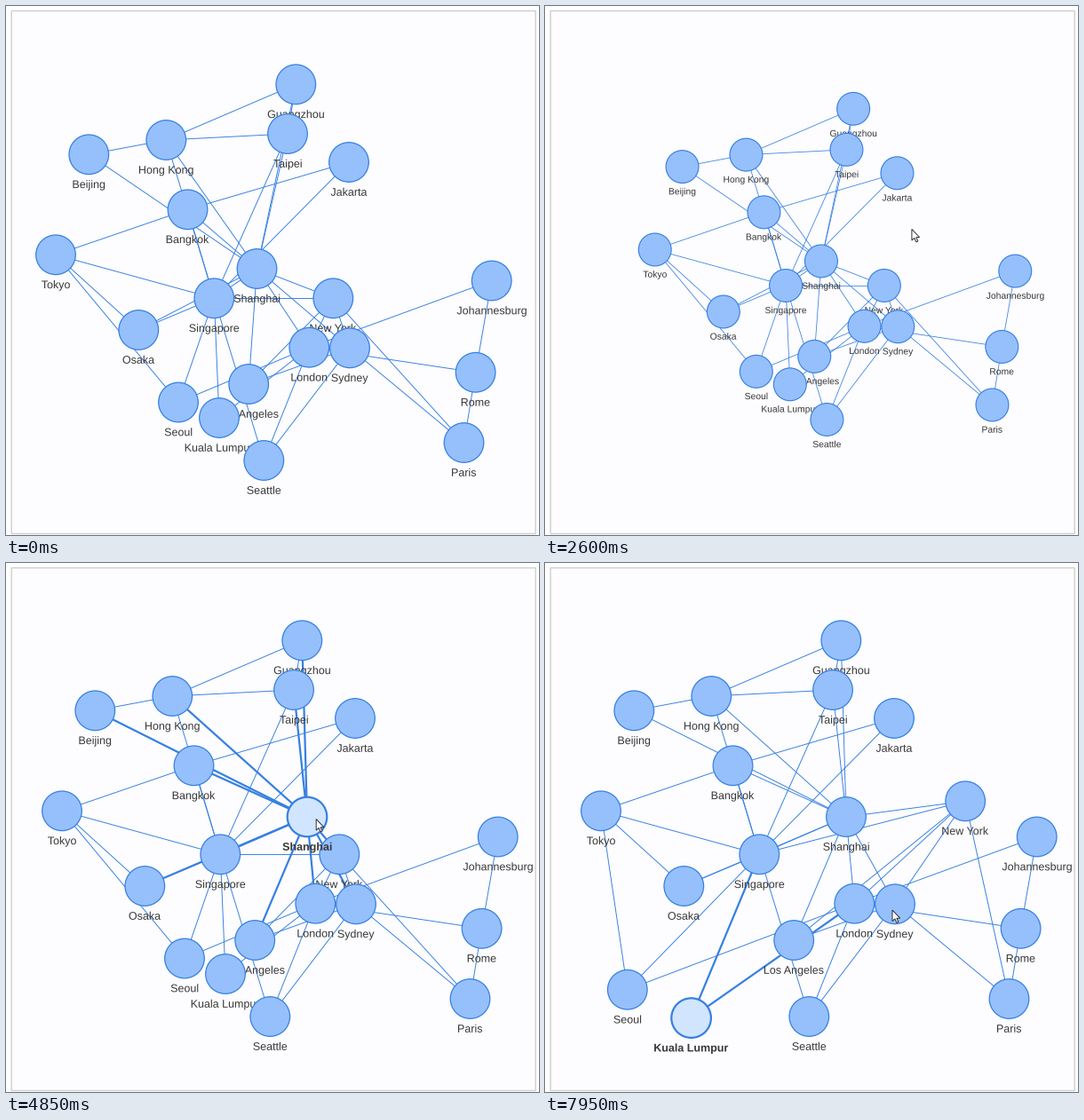
Write a matplotlib script that moves like this. It is 600 px wide and 596 px high and loops after 8 s.

```python
import numpy as np
import matplotlib.pyplot as plt
from matplotlib.animation import FuncAnimation
from matplotlib.collections import LineCollection
from matplotlib.patches import Circle, PathPatch, Polygon, Rectangle
from matplotlib.textpath import TextPath
from matplotlib.transforms import Affine2D

W, H, DPI = 600, 596, 100
STEP, LOOP = 50, 8000
PT = 72 / DPI
RADIUS, FONT, BASELINE = 22.3, 12.5, 37.8

BLUE, FILL, PICKED, INK = "#3580e2", "#96c0fc", "#d2e5ff", "#383838"

# Drawing order matters: later nodes cover earlier labels.
NODES = {
    "Guangzhou": (333.3, 87.3), "Taipei": (324, 143), "Hong Kong": (187.3, 150),
    "Beijing": (100.3, 166.3), "Jakarta": (393, 175), "Bangkok": (211.5, 228.3),
    "Tokyo": (63, 279.3), "Singapore": (241.3, 328.3), "Shanghai": (289.5, 295),
    "Osaka": (156.3, 364), "New York": (375.3, 328.3), "London": (348.3, 383.7),
    "Sydney": (394, 384.3), "Los Angeles": (280.2, 425), "Seoul": (201, 445.5),
    "Kuala Lumpur": (247, 463), "Seattle": (297.3, 511), "Johannesburg": (553.7, 308.5),
    "Rome": (535.6, 411.8), "Paris": (522.5, 491),
}

LINKS = {
    "Guangzhou": "Hong Kong,Taipei,Shanghai",
    "Taipei": "Hong Kong,Shanghai,Singapore",
    "Hong Kong": "Beijing,Shanghai,Singapore",
    "Jakarta": "Bangkok,Singapore",
    "Bangkok": "Tokyo,Shanghai,Singapore",
    "Tokyo": "Singapore,Osaka,Seoul",
    "Osaka": "Singapore,Shanghai",
    "Singapore": "Shanghai,New York,Seoul,Kuala Lumpur,Seattle",
    "Shanghai": "Beijing,New York,London,Sydney,Los Angeles",
    "New York": "London,Sydney,Los Angeles,Paris",
    "London": "Johannesburg,Rome,Seoul,Kuala Lumpur,Seattle",
    "Sydney": "Paris,Seattle,Los Angeles",
    "Rome": "Johannesburg,Paris",
}
EDGES = [(a, b) for a, ends in LINKS.items() for b in ends.split(",")]

# Four wheel notches out, then four back in, each about the pointer.
NOTCH, COUNT = 1.1, 4
OUT_TIMES = 1150 + 200 * np.arange(COUNT)
IN_TIMES = 2450 + 150 * np.arange(COUNT)
SHIFT = np.array([-7, 1])
OUT_AT = np.array([428, 249.3])
IN_AT = OUT_AT + SHIFT / (NOTCH ** COUNT - 1)

# Node, start, end, where it is dropped, where the pointer holds it
DRAGS = [
    ("Shanghai", 3500, 4100, (372, 284.5), (5, -3)),
    ("Shanghai", 4300, 4700, (339, 286), (5, -3)),
    ("New York", 5000, 5350, (473.2, 268.3), (2, -10)),
    ("Seoul", 5950, 6450, (92.8, 480.7), (2, -3)),
    ("Kuala Lumpur", 7000, 7450, (164.6, 512.6), (-13, 15)),
]


def plan_paths():
    """Turn the drags into (time, point) keys for each node and the pointer."""
    paths = {n: [(0, np.array(p))] for n, p in NODES.items()}
    pointer = [(900, np.array([540, 430])), (1100, OUT_AT), (1850, OUT_AT),
               (2300, IN_AT), (2950, IN_AT), (3100, np.array([440, 252]))]
    for name, t0, t1, drop, grip in DRAGS:
        start, drop = paths[name][-1][1], np.array(drop)
        paths[name] += [(t0, start), (t1, drop)]
        pointer += [(t0, start + grip), (t1 , drop + grip), (t1 + 100, drop + grip)]
    pointer += [(7800, np.array([460, 425])), (7950, np.array([391, 391]))]
    return paths, pointer


def along(keys, t):
    """Eased position on a path."""
    for (t0, p), (t1, q) in zip(keys, keys[1:]):
        if t < t1:
            u = max(0, (t - t0) / (t1 - t0))
            return p + (q - p) * u * u * (3 - 2 * u)
    return keys[-1][1]


def view(t):
    """Zoom factor and shift of the canvas."""
    s = NOTCH ** float(np.sum(t >= IN_TIMES) - np.sum(t >= OUT_TIMES))
    if t < IN_TIMES[0]:
        return s, OUT_AT * (1 - s) + SHIFT * s
    return s, IN_AT * (1 - s)


def label_path(name, weight):
    """Outline of a label, centred on x = 0."""
    path = TextPath((0, 0), name, size=FONT, prop={"weight": weight})
    box = path.get_extents()
    return path.transformed(Affine2D().translate(-(box.x0 + box.x1) / 2, 0))


plt.rcParams["font.family"] = "Liberation Sans"
fig = plt.figure(figsize=(W / DPI, H / DPI), dpi=DPI, facecolor="white")
ax = fig.add_axes([0, 0, 1, 1])
ax.set_xlim(0, W)
ax.set_ylim(H, 0)
ax.axis("off")

ax.add_patch(Rectangle((6.2, 5.5), 590, 589, fc="#fdfcfe", ec="#cfcfcf",
                       lw=1.4 * PT, zorder=0, snap=False))
lines = LineCollection([], colors=BLUE, zorder=1)
ax.add_collection(lines)

paths, pointer = plan_paths()
plain = {n: label_path(n, "normal") for n in NODES}
bold = {n: label_path(n, "bold") for n in NODES}
discs = {n: ax.add_patch(Circle((0, 0), RADIUS, ec=BLUE)) for n in NODES}
labels = {n: ax.add_patch(PathPatch(plain[n], fc=INK, lw=0)) for n in NODES}

tip = np.array([(0, 0), (0, 12.6), (2.9, 9.9), (4.9, 14.4), (6.9, 13.5),
                (4.9, 9.2), (8.7, 9.2)])
arrow = ax.add_patch(Polygon(tip, closed=True, fc="white", ec="#30303c",
                             lw=PT, zorder=50))


def draw(frame):
    t = frame * STEP
    s, shift = view(t)
    pick = next((d[0] for d in reversed(DRAGS) if t >= d[1]), None)
    pos = {n: along(keys, t) * s + shift for n, keys in paths.items()}

    lines.set_segments([(pos[a], pos[b]) for a, b in EDGES])
    lines.set_linewidths([(2.2 if pick in e else 0.95) * s * PT for e in EDGES])

    for i, (name, (x, y)) in enumerate(pos.items()):
        on = name == pick
        z = 2 + i + len(NODES) * on
        discs[name].set(center=(x, y), radius=RADIUS * s, zorder=z,
                        facecolor=PICKED if on else FILL,
                        linewidth=(2.2 if on else 1.25) * s ** 0.5 * PT)
        place = Affine2D().scale(s, -s).translate(x, y + BASELINE * s)
        labels[name].set(path=bold[name] if on else plain[name], zorder=z + 0.5,
                         transform=place + ax.transData)

    arrow.set_visible(t >= pointer[0][0])
    arrow.set_xy(tip + along(pointer, t))
    return [lines, arrow, *discs.values(), *labels.values()]


anim = FuncAnimation(fig, draw, frames=LOOP // STEP, interval=STEP,
                     repeat=True, repeat_delay=0, blit=False)
plt.show()
```
